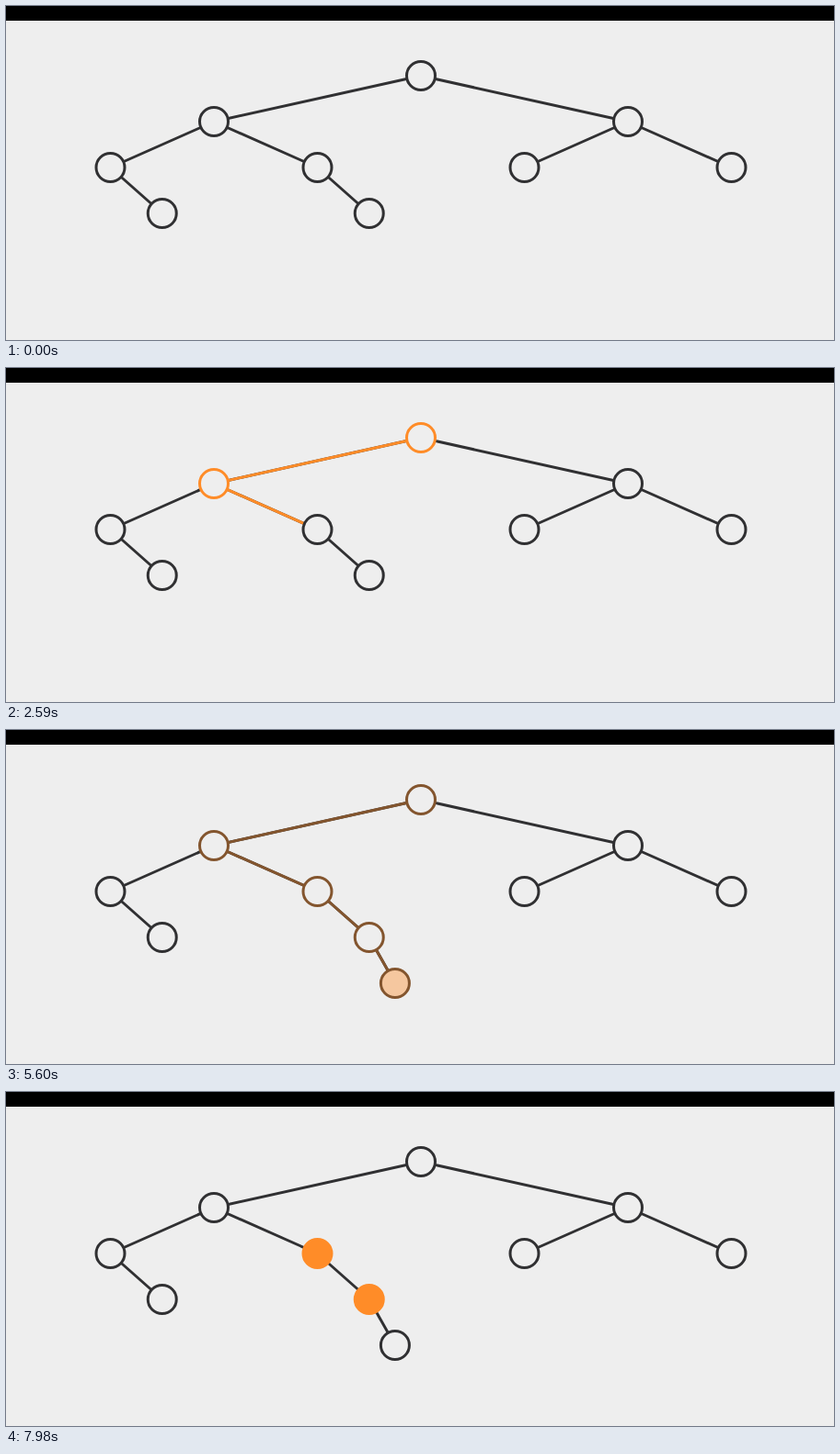
An HTML page for the animation above (8000 ms loop, 900 by 364 pixels).

```html
<!DOCTYPE html>
<html lang="en">
<head>
<meta charset="utf-8">
<title>Tree insertion</title>
<style>
  html, body { margin: 0; width: 100%; height: 100%; overflow: hidden; background: #eee; }
  svg { display: block; }
</style>
</head>
<body>
<svg id="stage" width="900" height="364" viewBox="0 0 900 364">
  <rect width="900" height="364" fill="#eee"/>
  <rect width="900" height="16" fill="#000"/>
</svg>
<script>
const LOOP = 8000, TICK = 70, TWEEN = 500, STEP = 528, START = 542;
const R = 15.5, LINE = 3, THICK = 10;
const DARK = [48, 48, 50], ORANGE = [255, 140, 40], PAPER = [238, 238, 238];
const GROW = 4800, RELAX = 5332, CHECK = 5860;

const stage = document.getElementById("stage");

function add(tag, attrs) {
  const el = document.createElementNS("http://www.w3.org/2000/svg", tag);
  set(el, attrs);
  stage.appendChild(el);
  return el;
}

function set(el, attrs) {
  for (const key in attrs) el.setAttribute(key, attrs[key]);
}

function mix(a, b, k) {
  return "rgb(" + a.map((v, i) => Math.round(v + (b[i] - v) * k)).join(",") + ")";
}

// Cubic in-out progress of the tween that begins at `start`.
function ease(t, start) {
  const p = Math.min(1, Math.max(0, (t - start) / TWEEN));
  return p < 0.5 ? 4 * p ** 3 : 1 - 4 * (1 - p) ** 3;
}

const at = (x, level) => ({ x, y: 76 + 50 * level });
const path = [at(451, 0), at(226, 1), at(338.5, 2), at(394.75, 3), at(422.9, 4)];
const [root, left] = path;
const right = at(676, 1), outer = at(113.5, 2);
const inner = at(169.75, 3), near = at(563.5, 2), far = at(788.5, 2);

function line(a, b) {
  return add("line", {
    x1: a.x, y1: a.y, x2: b.x, y2: b.y,
    stroke: mix(DARK, DARK, 0), "stroke-width": LINE
  });
}

function circle(p) {
  return add("circle", {
    cx: p.x, cy: p.y, r: R, "stroke-width": LINE,
    stroke: mix(DARK, DARK, 0), fill: mix(PAPER, PAPER, 0)
  });
}

[[left, outer], [outer, inner], [root, right], [right, near], [right, far]]
  .forEach(([a, b]) => line(a, b));

const edges = path.slice(1).map((p, i) => line(path[i], p));
const stubs = edges.map((_, i) => line(path[i], path[i + 1]));
const climb = line(path[3], path[2]);

[outer, inner, right, near, far].forEach(circle);
const nodes = path.map(circle);

// Orange bar from a towards b: wide on the way, thin on arrival.
function stretch(el, a, b, k, glow, endRadius) {
  const dx = b.x - a.x, dy = b.y - a.y, len = Math.hypot(dx, dy);
  const reach = (R + (len - R - endRadius) * k) / len;
  set(el, {
    x2: a.x + dx * reach, y2: a.y + dy * reach,
    "stroke-width": LINE + (THICK - LINE) * Math.min(1, 2 * (1 - k)),
    stroke: mix(DARK, ORANGE, glow),
    visibility: k > 0 && glow > 0 ? "visible" : "hidden"
  });
}

function paint(i, stroke, fill) {
  set(nodes[i], { stroke: mix(DARK, ORANGE, stroke), fill: mix(PAPER, ORANGE, fill) });
}

function draw(t) {
  const calm = 1 - ease(t, RELAX);
  const last = path.length - 1;

  // Walk down the tree, one node and one edge at a time.
  for (let i = 0; i < last; i++) {
    const enter = START + 2 * STEP * i;
    const lit = ease(t, enter), move = ease(t, enter + STEP);
    const isNew = i === last - 1;
    stretch(stubs[i], path[i], path[i + 1], move, calm, isNew ? 0 : R);
    paint(i, lit * calm, lit - move ** 1.4);
  }
  set(edges[last - 1], { visibility: calm < 1 ? "visible" : "hidden" });

  const size = ease(t, GROW);
  set(nodes[last], { r: R * size, visibility: size > 0 ? "visible" : "hidden" });
  paint(last, calm, calm);

  // Check balance on the way back up.
  if (t >= CHECK) {
    const leave = ease(t, CHECK + STEP);
    const parent = ease(t, CHECK + 2 * STEP);
    const child = ease(t, CHECK + 3 * STEP);
    const mark = ease(t, CHECK) - leave + child;
    paint(3, mark, mark);
    paint(2, parent, parent);
  }
  stretch(climb, path[3], path[2], ease(t, CHECK + STEP), 1 - ease(t, CHECK + 2 * STEP), R);
}

const begin = performance.now();

function frame() {
  const t = (performance.now() - begin) % LOOP;
  draw(Math.floor(t / TICK) * TICK);
  requestAnimationFrame(frame);
}

draw(0);
requestAnimationFrame(frame);
</script>
</body>
</html>
```
